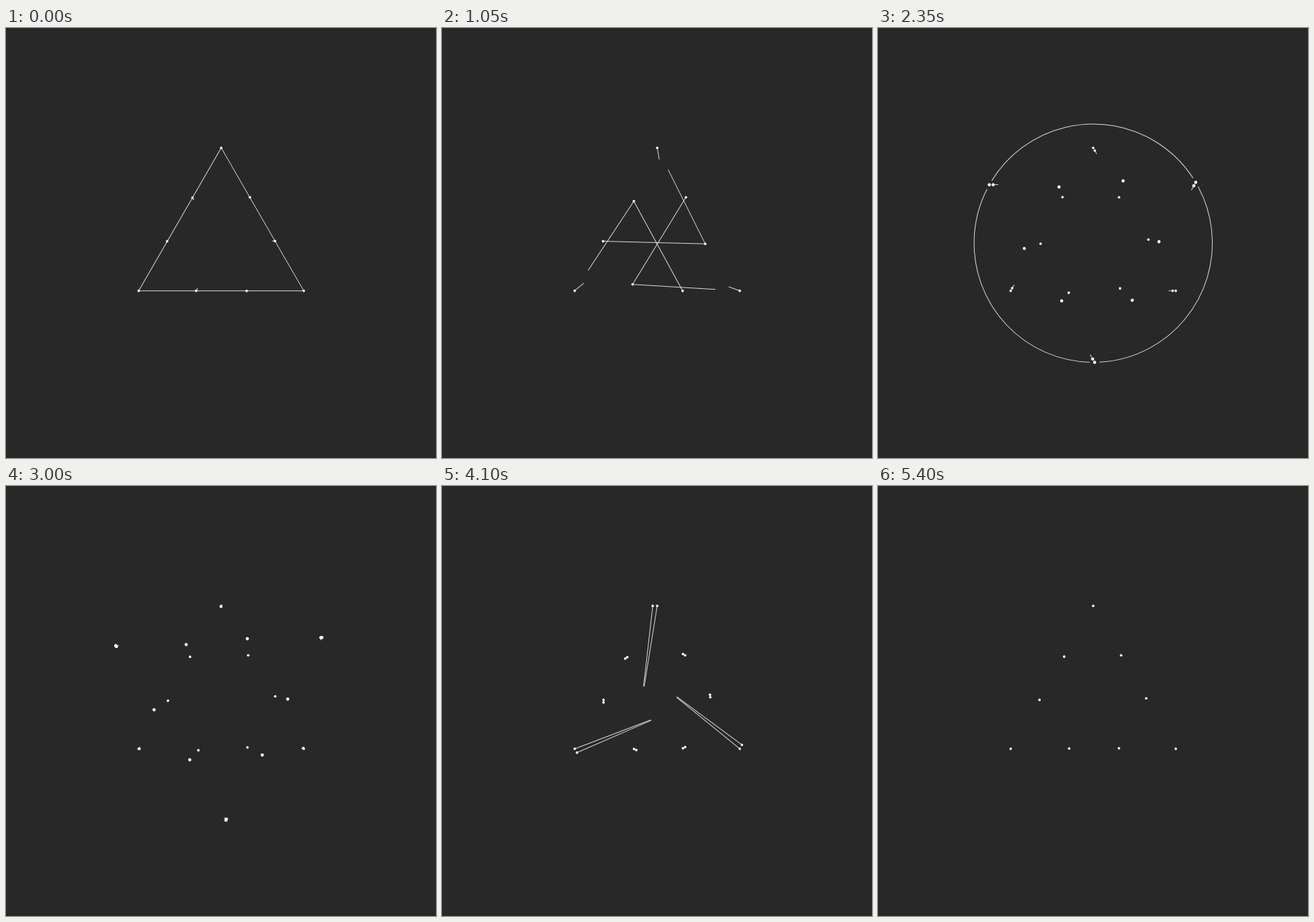
Recreate the animation shown at these times as an HTML page with a canvas. Size 600 by 600 pixels, loop 5.65 s.

```html
<!DOCTYPE html>
<html lang="en">
<head>
<meta charset="utf-8">
<title>Triangle geometry</title>
<style>
html, body { margin: 0; width: 100%; height: 100%; overflow: hidden; background: #282828; }
canvas { display: block; }
</style>
</head>
<body>
<canvas id="stage" width="600" height="600"></canvas>
<script>
const ctx = document.getElementById('stage').getContext('2d');
const LOOP = 5650, LAST = 5400, STEP = 50;
const THIRD = Math.PI * 2 / 3;
const RADIUS = 133;

const clamp = x => Math.max(0, Math.min(1, x));
const mix = (a, b, k) => a + (b - a) * k;
const cubic = x => x < .5 ? 4 * x ** 3 : 1 - 4 * (1 - x) ** 3;
const quint = x => x < .5 ? 16 * x ** 5 : 1 - 16 * (1 - x) ** 5;
const back = x => {
  const half = u => u * u * (3.595 * u - 2.595) / 2;
  return x < .5 ? half(2 * x) : 1 - half(2 - 2 * x);
};
const ease = (t, start, length, curve = cubic) => curve(clamp((t - start) / length));

// Position on a list of [time, x, y] keys.
function keyed(keys, t) {
  let i = 0;
  while (i < keys.length - 2 && t > keys[i + 1][0]) i++;
  const [t0, x0, y0] = keys[i], [t1, x1, y1] = keys[i + 1];
  const k = ease(t, t0, t1 - t0);
  return [mix(x0, x1, k), mix(y0, y1, k)];
}

function turn([x, y], thirds) {
  const c = Math.cos(THIRD * thirds), s = Math.sin(THIRD * thirds);
  return [x * c - y * s, x * s + y * c];
}

const upperKeys = [[0, 40, -64], [1750, 40, -64], [2350, 36, -64], [3600, 39, -64]];
const lowerKeys = [[0, 75, -3], [450, 77.5, -4.5], [1000, 67, 1], [1150, 67, 1],
  [1700, 75, -1.5], [2350, 77, -5], [3600, 74, -8], [4500, 74, -4]];

function dot([x, y]) {
  ctx.beginPath();
  ctx.arc(x, y, 1.75, 0, 7);
  ctx.fill();
}

// Draws the part of a polyline between two fractions of its length.
function trim(points, from, to) {
  if (to - from < .001) return;
  const sizes = points.slice(1).map((p, i) => Math.hypot(p[0] - points[i][0], p[1] - points[i][1]));
  const total = sizes.reduce((a, b) => a + b);
  let done = 0;
  ctx.beginPath();
  sizes.forEach((size, i) => {
    const a = clamp((from * total - done) / size), b = clamp((to * total - done) / size);
    done += size;
    if (b <= a) return;
    const [p, q] = [points[i], points[i + 1]];
    ctx.moveTo(mix(p[0], q[0], a), mix(p[1], q[1], a));
    ctx.lineTo(mix(p[0], q[0], b), mix(p[1], q[1], b));
  });
  ctx.stroke();
}

function arc(radius, from, to) {
  if (to - from < .001) return;
  ctx.beginPath();
  ctx.arc(0, 0, radius, from, to);
  ctx.stroke();
}

function drawThird(t, moving) {
  const top = [0, -RADIUS], corner = turn(top, 1);
  const upper = keyed(upperKeys, t), lower = keyed(lowerKeys, t);
  const grow = (points, start, length, wipe, wipeLength) =>
    trim(points, ease(t, wipe, wipeLength), ease(t, start, length));

  // Triangle folding into a star.
  if (t < 1500) {
    trim([lower, corner], ease(t, 50, 600), 1);
    trim([top, lower, turn(upper, 2)], ease(t, 850, 650), mix(.513, 1, ease(t, 50, 700)));
  }

  // Long chords, wiped from both ends.
  const shrink = ease(t, 1600, 500) / 2;
  trim([top, turn(upper, 1)], shrink, Math.min(ease(t, 900, 550), 1 - shrink));
  grow([upper, turn(lower, 2)], 1600, 460, 1900, 400);

  // Outer ring on the turning copy.
  if (moving) {
    const gap = ease(t, 2200, 700) / 2;
    const end = Math.min(ease(t, 1800, 450), 1 - gap);
    arc(RADIUS, -Math.PI / 2 + THIRD * gap, -Math.PI / 2 + THIRD * end);
  }

  // Sides of the hexagram, each followed by a dot.
  const tail = ease(t, 2200, 900);
  trim([top, corner], tail, ease(t, 2200, 680));
  if (tail > 0 && tail < 1) dot([mix(top[0], corner[0], tail), mix(top[1], corner[1], tail)]);

  // Spokes and inner ring.
  grow([top, upper], 2900, 450, 3250, 600);
  const start = Math.atan2(lower[1], lower[0]);
  arc(74, start + THIRD * ease(t, 3415, 600), start + THIRD * ease(t, 2950, 600));

  // Mirrored chords, then the closing sides.
  const chordEnd = Math.min(ease(t, 3850, 480), 1 - ease(t, 4250, 600));
  trim([top, turn(lower, 1)], 0, chordEnd);
  grow([top, corner], 4420, 650, 4750, 600);

  [top, upper, lower].forEach(dot);
}

function drawFigure(t, angle, scale, moving) {
  ctx.save();
  ctx.translate(300.3, 300.2);
  ctx.rotate(angle * Math.PI / 180);
  ctx.scale(scale, scale);
  ctx.lineWidth = 1 / scale;

  const glow = ease(t, 1400, 150) * (1 - ease(t, 1750, 200));
  if (glow > 0) {
    ctx.fillStyle = `rgba(255,255,255,${.24 * glow})`;
    ctx.beginPath();
    for (let i = 0; i < 3; i++) ctx.lineTo(...turn([17, -44], i));
    ctx.fill();
  }
  ctx.fillStyle = '#fff';
  for (let i = 0; i < 3; i++) {
    drawThird(t, moving);
    ctx.rotate(THIRD);
  }
  ctx.restore();
}

function draw(t) {
  ctx.fillStyle = '#282828';
  ctx.fillRect(0, 0, 600, 600);
  ctx.strokeStyle = 'rgba(255,255,255,.8)';
  drawFigure(t, 0, 1, false);
  if (t > 1400 && t < 4700) {
    const angle = -60 * ease(t, 1400, 1000, back) + 60 * ease(t, 2900, 1000, back)
      - 120 * ease(t, 3885, 800, quint);
    const scale = 1 + .25 * (ease(t, 1750, 500) - ease(t, 3050, 750));
    drawFigure(t, angle, scale, true);
  }
}

function frame() {
  const t = performance.now() % LOOP;
  draw(Math.min(LAST, Math.floor(t / STEP) * STEP));
  requestAnimationFrame(frame);
}
frame();
</script>
</body>
</html>
```
